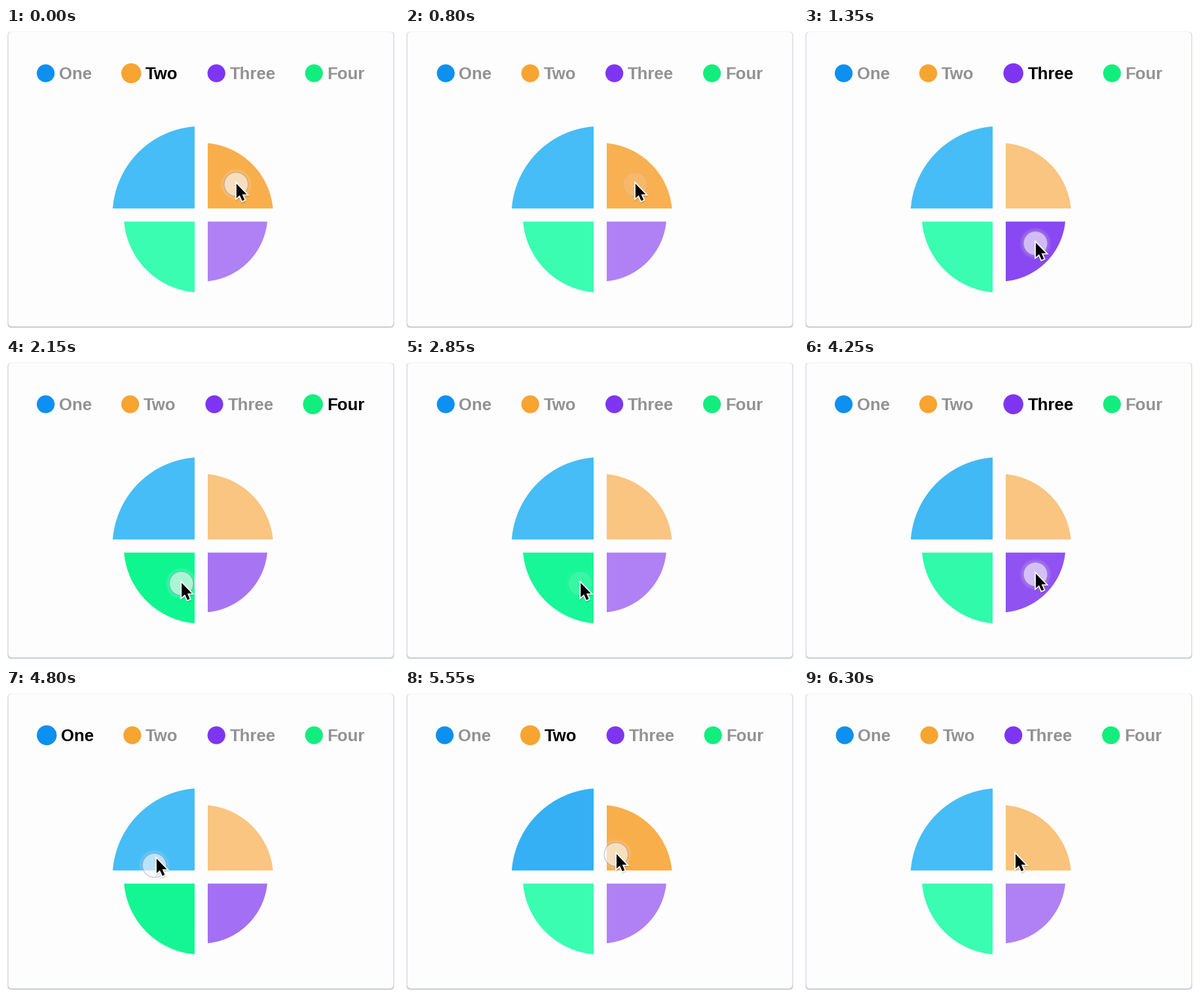
Recreate the animation shown at these times as a matplotlib script. Size 600x462 px, loop 6.35 s.

```python
import numpy as np
import matplotlib.pyplot as plt
from matplotlib.animation import FuncAnimation
from matplotlib.colors import to_rgb
from matplotlib.patches import Circle, FancyBboxPatch, Polygon

W, H, DPI = 600, 462, 100
STEP, FRAMES = 50, 127
BLEND = 0.35                    # share of the colour change made per step
CX, CY, GAP = 298, 285.2, 10
DOT, BIG_DOT, PAD = 13.6, 15.2, 6.7
ROW_MID, ROW_WIDTH = 297.4, 497.6

# name, radius, resting, lit and legend colours, clockwise from top left
SLICES = [
    ("One", 135.4, "#46bdf6", "#098dee", "#0d90f0"),
    ("Two", 110.0, "#f9c580", "#f8a537", "#f7a431"),
    ("Three", 101.4, "#af81f5", "#8440f0", "#7e35f2"),
    ("Four", 118.2, "#3afdb2", "#04f488", "#12ee7e"),
]
# The pointer swings around the centre: start, end, then angle and radius
MOVES = [
    (800, 1150, 37, 70), (1650, 2100, 118, 63.5), (3100, 3350, 204, 71),
    (3850, 4200, 37, 70), (4505, 4870, 220, 74), (5200, 5550, 305.5, 43),
]
START = np.array([-41.6, 72])
TOUCHES = [(0, 750), (1100, 2800), (3350, 6000)]


def polar(t):
    pos = START
    for begin, end, *goal in MOVES:
        u = np.clip((t - begin) / (end - begin), 0, 1)
        pos = pos + (goal - pos) * u * u * (3 - 2 * u)
    return pos


def pointer(t):
    angle, r = polar(t)
    a = np.radians(angle)
    return np.array([CX + r * np.cos(a), CY + r * np.sin(a)])


def touched(t):
    return any(a <= t < b for a, b in TOUCHES)


def active_slice(t):
    return int(polar(t)[0] // 90 + 2) % 4 if touched(t) else None


ACTIVE = [active_slice(i * STEP) for i in range(FRAMES)]
LIT = np.zeros((FRAMES, 4))
LIT[0, ACTIVE[0]] = 1 - (1 - BLEND) ** 3
PRESS = np.ones(FRAMES)
for i in range(1, FRAMES):
    goal = np.array([k == ACTIVE[i - 1] for k in range(4)])
    LIT[i] = LIT[i - 1] + (goal - LIT[i - 1]) * BLEND
    rate = 0.5 if touched(i * STEP) else -0.4
    PRESS[i] = np.clip(PRESS[i - 1] + rate, 0, 1)

fig = plt.figure(figsize=(W / DPI, H / DPI), dpi=DPI, facecolor="white")
ax = fig.add_axes([0, 0, 1, 1])
ax.set(xlim=(0, W), ylim=(H, 0))
ax.axis("off")


def card(grow, drop, **style):
    ax.add_patch(FancyBboxPatch(
        (3.5 - grow, 6 - grow + drop), 588 + 2 * grow, 449 + 2 * grow, lw=0,
        boxstyle="round,pad=0,rounding_size=6", **style))


for grow in (1.5, 1.0, 0.5):
    card(grow, 1, fc="#6f7c90", alpha=0.15)
card(0, 0, fc="#fefdfe")


def wedge(r, k):
    """Quarter disc k, cut back from both axes by the gap."""
    edge = np.arcsin(GAP / r)
    a = np.linspace(edge, np.pi / 2 - edge, 80)
    x, y = np.append(r * np.cos(a), GAP), np.append(r * np.sin(a), GAP)
    turn = (k + 2) * np.pi / 2
    c, s = np.cos(turn), np.sin(turn)
    return np.column_stack([CX + c * x - s * y, CY + s * x + c * y])


wedges, dots, labels = [], [], []
for k, (name, r, rest, lit, dot) in enumerate(SLICES):
    wedges.append(ax.add_patch(Polygon(wedge(r, k), lw=0)))
    dots.append(ax.add_patch(Circle((0, 69), DOT, fc=dot, lw=0)))
    labels.append(ax.text(0, 78, name, family="Liberation Sans",
                          weight="bold", size=25.7 * 72 / DPI, va="baseline"))
TEXT_W = [label.get_window_extent().width for label in labels]
SPACE = (ROW_WIDTH - sum(TEXT_W) - 4 * (2 * DOT + PAD)) / 3

# Soft glow, then the touch disc itself
halo = [ax.add_patch(Circle((0, 0), r, fc="white", lw=0, zorder=5))
        for r in (24, 22.5, 21)]
disc = ax.add_patch(Circle((0, 0), 18.3, lw=0.9, zorder=6))

ARROW = np.array([(0, 0), (0, 22), (5, 17.6), (8.8, 26.2), (12.4, 24.6),
                  (8.7, 16.2), (15.6, 16.2)])
shadow = ax.add_patch(Polygon(ARROW, fc="black", ec="black", lw=2.6,
                              alpha=0.13, zorder=7))
arrow_rim = ax.add_patch(Polygon(ARROW, fc="white", ec="white", lw=2.5,
                                 zorder=8))
arrow = ax.add_patch(Polygon(ARROW, fc="black", lw=0, zorder=9))


def mix(a, b, k):
    a, b = np.array(to_rgb(a)), np.array(to_rgb(b))
    return a + (b - a) * k


def draw_legend(active):
    """Lay the row out around its middle; the active item is wider."""
    x = ROW_MID - ROW_WIDTH / 2
    if active is not None:
        x -= BIG_DOT - DOT
    for k, (dot, label) in enumerate(zip(dots, labels)):
        on = k == active
        r = BIG_DOT if on else DOT
        dot.set_radius(r)
        dot.center = x + r, 69
        label.set_x(x + 2 * r + PAD)
        label.set_color("black" if on else "#929292")
        x += 2 * r + PAD + TEXT_W[k] + SPACE


def draw(i):
    t = i * STEP
    for shape, (_, _, rest, lit, _), w in zip(wedges, SLICES, LIT[i]):
        shape.set_facecolor(mix(rest, lit, w))
    draw_legend(ACTIVE[i])

    tip = pointer(t)
    spot = pointer(t - 15) + (-0.5, 1)
    for ring in halo:
        ring.center = spot
        ring.set_alpha(0.06 * PRESS[i])
    disc.center = spot
    disc.set_facecolor((0.97, 0.97, 0.98, 0.6 * PRESS[i]))
    disc.set_edgecolor((0.45, 0.48, 0.6, 0.4 * PRESS[i]))
    shadow.set_xy(ARROW + tip + (0.5, 1.8))
    arrow_rim.set_xy(ARROW + tip)
    arrow.set_xy(ARROW + tip)
    return []


anim = FuncAnimation(fig, draw, frames=FRAMES, interval=STEP,
                     repeat=True, repeat_delay=0, blit=False)
plt.show()
```
